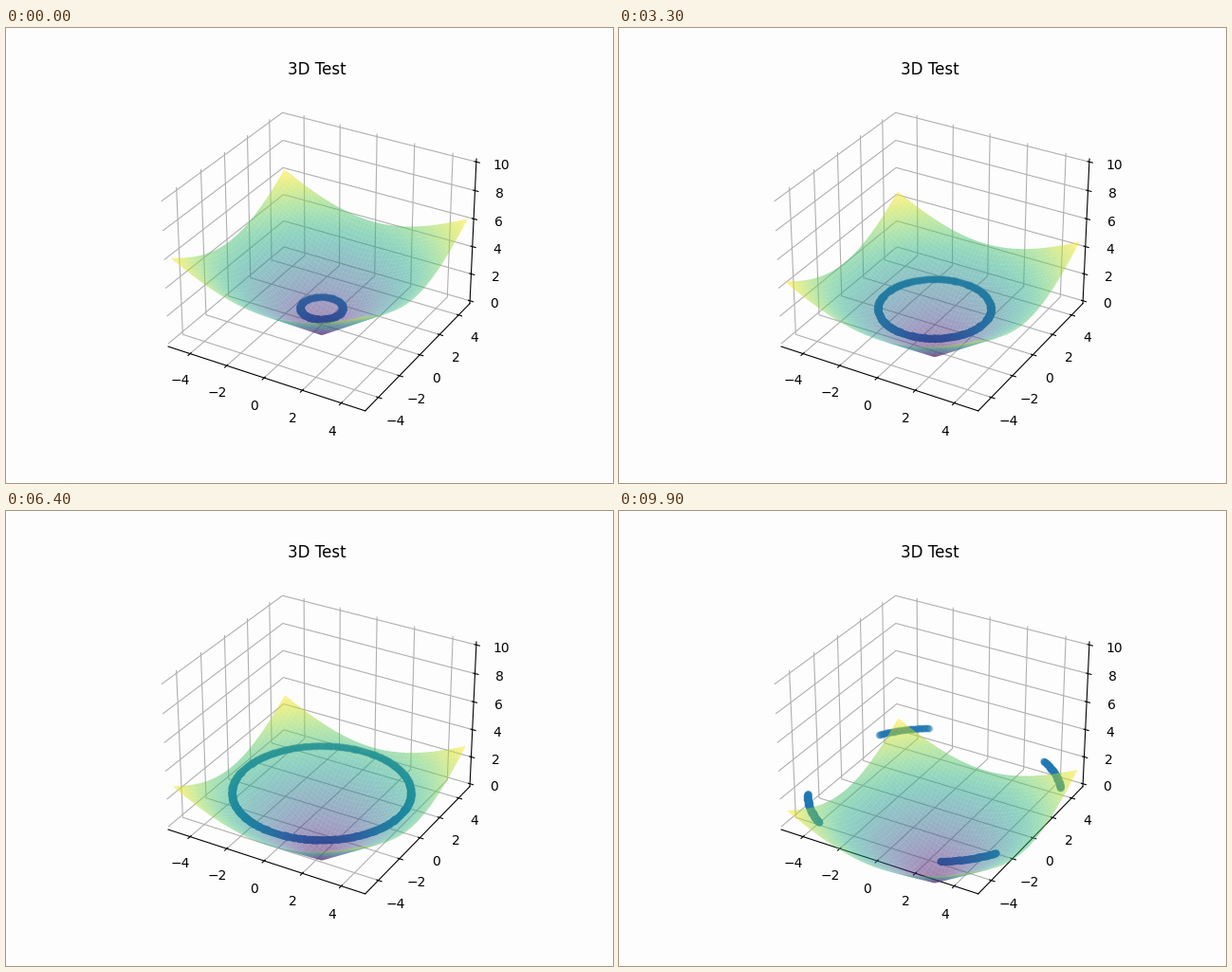
A matplotlib script for the animation above (10000 ms loop, 640x480 px).

```python
import numpy as np
import matplotlib.pyplot as plt
from matplotlib.animation import FuncAnimation

FRAMES = 100
INTERVAL = 100
PAPER = "#fdfdfd"
MARGIN = 1 / 48

side = np.linspace(-5, 5, 150)
X, Y = np.meshgrid(side, side)
R = np.hypot(X, Y)

fig = plt.figure(figsize=(6.4, 4.8), dpi=100, facecolor=PAPER)
ax = fig.add_subplot(projection="3d", computed_zorder=False, facecolor=PAPER)
ax.set_title("3D Test")
ax.set_xlim(-5, 5, view_margin=MARGIN)
ax.set_ylim(-5, 5, view_margin=MARGIN)
ax.set_zlim(0, 10, view_margin=MARGIN)
for axis in (ax.xaxis, ax.yaxis, ax.zaxis):
    axis.set_pane_color(PAPER)

artists = []


def update(i):
    """Lower the cone and widen the ring of grid points at height 1."""
    while artists:
        artists.pop().remove()
    radius = 1 + 0.05 * i
    ring = np.abs(R - radius) < 0.05
    artists.append(ax.scatter(X[ring], Y[ring], np.ones(ring.sum()),
                              color="C0", zorder=1))
    artists.append(ax.plot_surface(X, Y, R - radius, cmap="viridis",
                                   alpha=0.5, zorder=2))
    return artists


anim = FuncAnimation(fig, update, frames=FRAMES, init_func=lambda: update(0),
                     interval=INTERVAL, repeat=True, repeat_delay=0)
plt.show()
```
